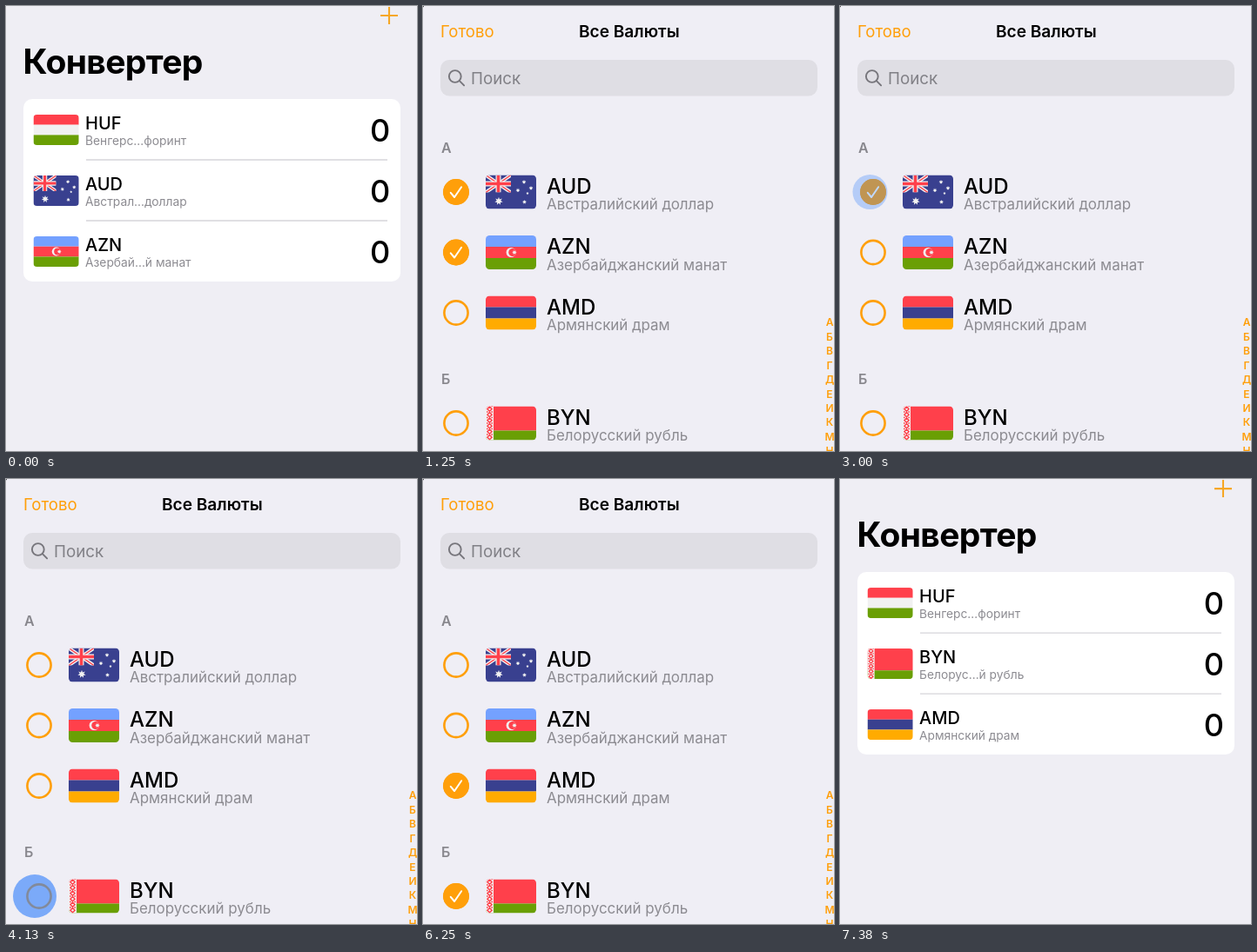
Animation, 472 px wide and 512 px high, one loop 7.51 s. Source, as an HTML page:

```html
<!DOCTYPE html>
<html lang="ru">
<head>
<meta charset="utf-8">
<title>Конвертер</title>
<style>
  html, body { margin: 0; width: 100%; height: 100%; overflow: hidden; background: #000; }
  svg { display: block; width: 472px; height: 512px; font-family: Inter, "Open Sans", sans-serif; }
  .h1 { font-size: 39px; font-weight: 700; letter-spacing: -.6px; }
  .code { font-size: 20px; font-weight: 500; }
  .name { font-size: 13.8px; fill: #8c8b91; }
  .sum { font-size: 36px; font-weight: 500; text-anchor: middle; }
  .title { font-size: 19.1px; font-weight: 600; text-anchor: middle; }
  .done { font-size: 18.6px; fill: #ff9f0a; }
  .find { font-size: 18.8px; fill: #818086; }
  .head { font-size: 16px; font-weight: 600; fill: #88878d; }
  .big .code { font-size: 24px; }
  .big .name { font-size: 16.95px; }
  .index { font-size: 12px; font-weight: 600; fill: #ff9f0a; text-anchor: middle; }
</style>
</head>
<body>
<svg viewBox="0 0 472 512">
  <defs>
    <clipPath id="round"><rect width="58" height="39" rx="4.5"/></clipPath>
    <clipPath id="canton"><rect width="29" height="20"/></clipPath>
  </defs>
  <g id="home">
    <rect x="-2" y="-72" width="478" height="1100" fill="#efeef4"/>
    <path id="plus" d="M430 11h20M440 1v20" stroke-width="2.1"/>
    <text class="h1" x="19.5" y="77.5">Конвертер</text>
    <rect x="20" y="107" width="433" height="210" rx="10" fill="#fff"/>
    <path d="M92 177H438M92 247H438" stroke="#d6d5da" stroke-width="1.3"/>
    <g id="before"></g>
    <g id="after"></g>
  </g>
  <rect id="dim" width="472" height="512"/>
  <g id="sheet">
    <rect x="-2" y="-4" width="478" height="1100" rx="12" fill="#efeef5"/>
    <text id="done" class="done" x="20" y="35.5">Готово</text>
    <text class="title" x="236.8" y="35.5">Все Валюты</text>
    <rect x="20" y="62" width="433" height="41.5" rx="10" fill="#dfdee4"/>
    <g fill="none" stroke="#76757b" stroke-width="1.9" stroke-linecap="round">
      <circle cx="36.8" cy="81" r="6.9"/><path d="M41.9 86.1l5.2 5.3"/>
    </g>
    <text class="find" x="55" y="90">Поиск</text>
    <text class="head" x="21" y="169">А</text>
    <text class="head" x="21" y="435">Б</text>
    <g id="list" class="big"></g>
    <g id="index" class="index"></g>
  </g>
  <circle id="finger" fill="rgb(48,125,252)"/>
</svg>
<script>
const $ = id => document.getElementById(id);
const RED = '#ff404b', GREEN = '#6a9f04', NAVY = '#39408f', GOLD = '#ffab00',
      BLUE = '#74a1ff', PALE = '#f1f1f1', TINT = '#ff9f0a';

// Flags, drawn on a 58 x 39 field
const band = (y, h, fill) => `<rect y="${y}" width="58" height="${h}" fill="${fill}"/>`;
const bands = (...fills) => fills.map((f, i) => band(i * 13, 13, f)).join('');
const line = (d, color, w) => `<path d="${d}" stroke="${color}" stroke-width="${w}" fill="none"/>`;

function star(x, y, r, n = 7) {
  const pts = Array.from({ length: n * 2 }, (_, i) => {
    const a = Math.PI * i / n - Math.PI / 2, q = i % 2 ? r * .48 : r;
    return (x + q * Math.cos(a)).toFixed(2) + ',' + (y + q * Math.sin(a)).toFixed(2);
  });
  return `<polygon points="${pts.join(' ')}" fill="${PALE}"/>`;
}

function australia() {
  const diag = 'M0 0L29 20M29 0L0 20', cross = 'M14.5 0V20M0 10H29';
  return band(0, 39, NAVY) +
    `<g clip-path="url(#canton)">${line(diag, PALE, 4)}${line(diag, RED, 1.4)}` +
    `${line(cross, PALE, 6)}${line(cross, RED, 3.6)}</g>` +
    star(15, 30, 4.8) + star(44, 8, 2.6) + star(37, 17.5, 2.6) + star(52, 15, 2.6) +
    star(44.5, 31, 2.6) + star(48, 21, 1.7, 5);
}

function belarus() {
  let lace = '';
  for (let y = 0; y < 39; y += 6.5)
    lace += `M4.5 ${y + .6}l2.6 2.6l-2.6 2.6l-2.6 -2.6zM1 ${y}h1.6M6.4 ${y}h1.6`;
  return band(0, 28, RED) + band(28, 11, GREEN) +
    `<rect width="9" height="39" fill="${PALE}"/>` + line(lace, RED, 1.4);
}

const flags = {
  HUF: bands(RED, PALE, GREEN),
  AUD: australia(),
  AZN: bands(BLUE, RED, GREEN) +
    `<circle cx="29.2" cy="19.5" r="5.6" fill="${PALE}"/>` +
    `<circle cx="30.8" cy="19.5" r="4.5" fill="${RED}"/>` + star(33, 19.5, 2.9, 8),
  AMD: bands(RED, NAVY, GOLD),
  BYN: belarus()
};

const flag = (code, x, y, k) =>
  `<g transform="translate(${x} ${y}) scale(${k})" clip-path="url(#round)">${flags[code]}</g>`;
const text = (cls, x, y, s) => `<text class="${cls}" x="${x}" y="${y}">${s}</text>`;

function cards(rows) {
  return rows.map(([code, name], i) => {
    const c = 142.5 + 70 * i;
    return flag(code, 31.5, c - 17.5, .9) + text('code', 91, c - .5, code) +
      text('name', 91, c + 17, name) + text('sum', 429.5, c + 13.2, '0');
  }).join('');
}

$('before').innerHTML = cards([['HUF', 'Венгерс…форинт'],
  ['AUD', 'Австрал…доллар'], ['AZN', 'Азербай…й манат']]);
$('after').innerHTML = cards([['HUF', 'Венгерс…форинт'],
  ['BYN', 'Белорус…й рубль'], ['AMD', 'Армянский драм']]);

// Sheet rows: code, name, centre, checked at first, time of the toggle
const rows = [
  ['AUD', 'Австралийский доллар', 214, true, 3200],
  ['AZN', 'Азербайджанский манат', 283.5, true, 2150],
  ['AMD', 'Армянский драм', 353, false, 5200],
  ['BYN', 'Белорусский рубль', 480, false, 4250]
];

$('list').innerHTML = rows.map(([code, name, c]) =>
  `<circle cx="38" cy="${c}" r="13.6" fill="none" stroke="${TINT}" stroke-width="2.6"/>` +
  `<g id="on${code}"><circle cx="38" cy="${c}" r="14.9" fill="${TINT}"/>` +
  `<path d="M31.8 ${c + .8}l4.3 5.2l8 -11.8" fill="none" stroke="#fff" stroke-width="2" ` +
  `stroke-linecap="round" stroke-linejoin="round"/></g>` +
  flag(code, 72, c - 19.5, 1) + text('code', 142, c + 1.6, code) +
  text('name', 142, c + 20, name)).join('');

$('index').innerHTML = [...'АБВГДЕИКМН'].map((s, i) =>
  text('', 467, 368.3 + 16.45 * i, s)).join('');

// Touches: start, end, x, y
const taps = [
  [100, 300, 440, 11],
  [1875, 2200, 34, 284],
  [2925, 3250, 34.5, 214],
  [3975, 4300, 33, 480],
  [5000, 5300, 31, 362],
  [6500, 6900, 53, 34.5]
];

const LOOP = 7510, TRAVEL = 950, OPEN = 300, CLOSE = 6836, MID = 237;
const clamp = v => Math.max(0, Math.min(1, v));
const spring = ms => {
  const x = Math.max(0, ms) * .01606;
  return 1 - (1 + x) * Math.exp(-x);
};
const show = (id, on) => $(id).setAttribute('visibility', on ? 'visible' : 'hidden');

function draw(t) {
  const p = t < CLOSE ? spring(t - OPEN) : 1 - spring(t - CLOSE);
  const k = 1 - .0955 * p;
  $('home').setAttribute('transform', `translate(${MID * (1 - k)} ${47.3 * p}) scale(${k})`);
  $('sheet').setAttribute('transform', `translate(0 ${TRAVEL * (1 - p)})`);
  $('dim').setAttribute('opacity', .125 * p);
  $('plus').setAttribute('stroke', p > .5 ? '#bdbbac' : '#f6a725');
  $('done').setAttribute('opacity', t > 6600 ? .3 : 1);
  show('before', t < 3500);
  show('after', t >= 3500);
  for (const [code, , , on, at] of rows) show('on' + code, on === t < at);

  const tap = taps.find(([a, b]) => t >= a && t < b + 150);
  show('finger', tap);
  if (!tap) return;
  const [a, b, x, y] = tap;
  const f = Math.min(clamp((t - a) / 150), clamp((b + 150 - t) / 150));
  const dot = $('finger');
  dot.setAttribute('cx', x);
  dot.setAttribute('cy', y);
  dot.setAttribute('r', 15 + 10 * f);
  dot.setAttribute('opacity', .6 * f);
}

// Eight pictures per second, on a 10 ms clock
function snap(t) {
  const i = Math.floor(t / 250) * 2 + (t % 250 >= 130 ? 1 : 0);
  return Math.min(i, 59) * 125;
}

const start = performance.now();
function tick() {
  draw(snap((performance.now() - start) % LOOP));
  requestAnimationFrame(tick);
}
tick();
</script>
</body>
</html>
```
